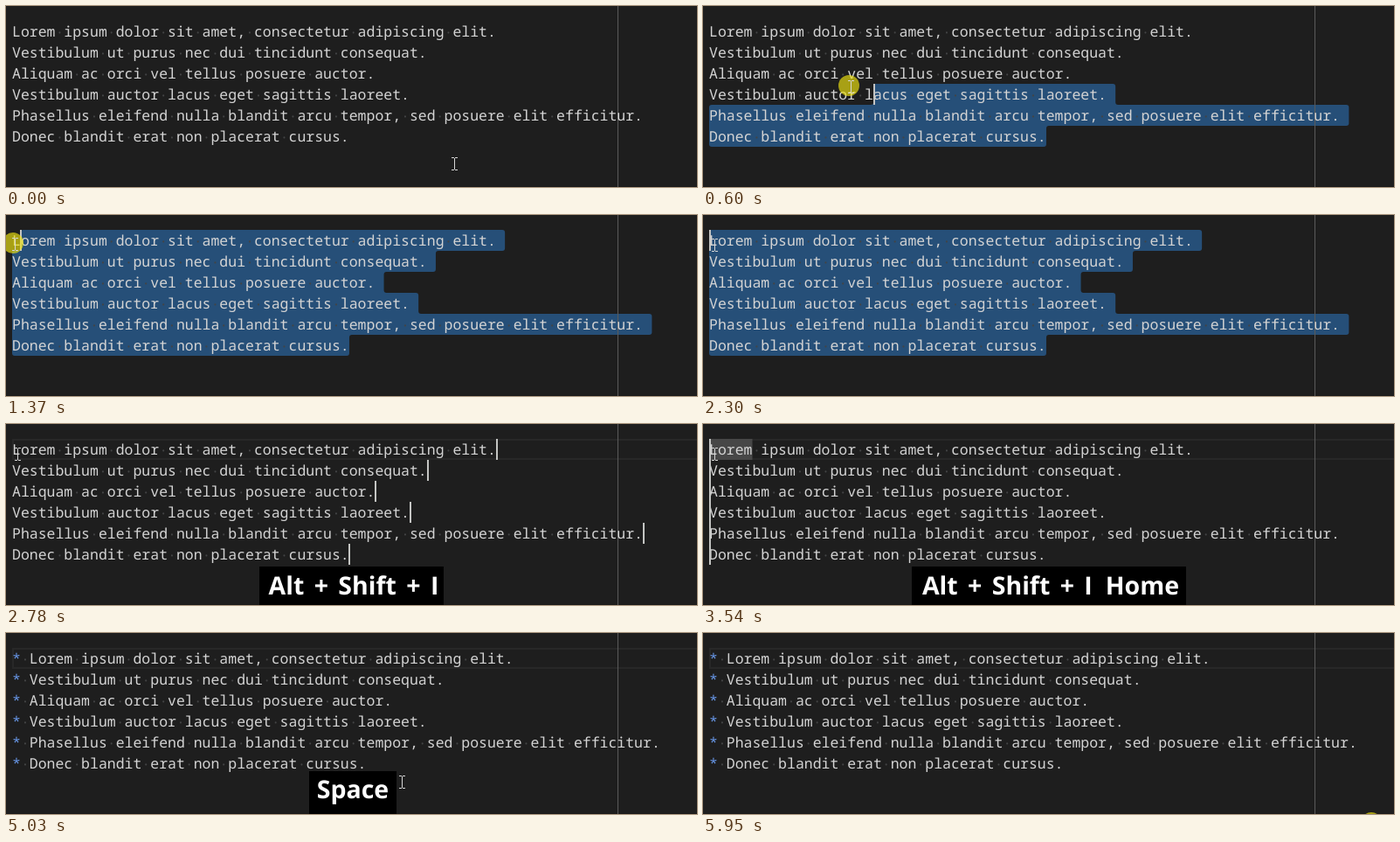
Animation, 791 px wide and 207 px high, one loop 6040 ms. Source, as an HTML page:

```html
<!DOCTYPE html>
<html lang="en">
<head>
<meta charset="utf-8">
<title>Multi-cursor editing</title>
<style>
html, body { margin: 0; width: 100%; height: 100%; overflow: hidden; background: #1e1e1e; }
svg { display: block; width: 791px; height: 207px; }
text { text-rendering: geometricPrecision; white-space: pre; }
.code { font: 16.495px "Noto Sans Mono", monospace; fill: #d4d4d4; }
.dots { fill: #434445; }
.bullet { fill: #6796e6; }
#label { font: bold 28.5px "Open Sans", "Noto Sans", sans-serif; fill: #fff; text-anchor: middle; }
.chord { word-spacing: 4px; }
</style>
</head>
<body>
<svg viewBox="0 0 791 207">
  <rect width="791" height="207" fill="#1e1e1e"/>
  <rect y="206" width="791" height="1" fill="#191919"/>
  <rect id="current" x="8" y="18" width="800" height="22" fill="none" stroke="#282828" stroke-width="2"/>
  <path id="selection" fill="#264f78"/>
  <rect id="word" x="7" y="17" width="49.5" height="24" fill="#474747"/>
  <rect x="700" width="1" height="207" fill="#5a5a5a"/>
  <g id="rows"></g>
  <path id="carets" fill="#c4c5c3"/>
  <rect id="box" fill="#000"/>
  <text id="label"></text>
  <g id="mouse">
    <circle id="press" cx="-2.5" cy="-1.5" r="12" fill="#f0e410" fill-opacity=".66"/>
    <path d="M-3.5-7h3M.5-7h3M0-6.5V6.5M-3.5 7h3M.5 7h3" fill="none" stroke="#d6d6d6"/>
  </g>
</svg>
<script>
const LOOP = 6040, LEFT = 7, TOP = 17, ROW = 24, CHAR = 9.897;
const lines = [
  'Lorem ipsum dolor sit amet, consectetur adipiscing elit.',
  'Vestibulum ut purus nec dui tincidunt consequat.',
  'Aliquam ac orci vel tellus posuere auctor.',
  'Vestibulum auctor lacus eget sagittis laoreet.',
  'Phasellus eleifend nulla blandit arcu tempor, sed posuere elit efficitur.',
  'Donec blandit erat non placerat cursus.'
];

// time, x, y, strength of the pressed-button disc
const pointer = [
  [0, 513.5, 180.5, 0], [70, 496, 173, 0], [140, 458, 161, 0], [210, 434.5, 155.5, 0],
  [360, 392, 152, 1], [440, 270, 122, 1], [520, 197, 100, 1], [600, 169.5, 92.5, 1],
  [680, 140, 82, 1], [760, 110, 70, 1], [830, 85, 60, 1], [910, 62, 49, 1],
  [990, 45, 43, 1], [1070, 34, 39, 1], [1140, 26, 37, 1], [1220, 18, 35, 1],
  [1290, 10.5, 33.5, 1], [1770, 10.5, 33.5, .5], [1840, 13.5, 34.5, 0],
  [4960, 160, 75, 0], [5030, 453.5, 170.5, 0], [5110, 600, 189, 0], [5190, 690, 196, 0],
  [5260, 725, 198, 0], [5340, 740, 200, 0], [5420, 744, 203, 0], [5490, 767, 230, 0],
  [5950, 767.5, 218.5, 1]
];
const caretModes = [
  [0, 'none'], [360, 'select'], [1770, 'none'], [2300, 'select'], [2780, 'end'],
  [3230, 'home'], [3710, 'none'], [4100, 'home'], [4710, 'none'], [5190, 'home'], [5720, 'none']
];
const prefixes = [[0, ''], [4100, '*'], [4180, '* ']];

const chord = 'Alt + Shift + I';
// time, box left, box right, box top, baseline, keys
const labels = [
  [0, 0, 0, 0, 0, []],
  [2780, 290, 501, 163, 195, [chord]],
  [3310, 239, 553, 163, 195, [chord, 'Home']],
  [3780, 345, 449, 165, 195, ['Home']],
  [4100, 331, 463, 165, 195, ['Home', '*']],
  [4180, 283, 511, 158, 190, ['Home', '*', 'Space']],
  [4250, 332, 462, 158, 190, ['*', 'Space']],
  [4960, 347, 447, 158, 189, ['Space']],
  [5190, 0, 0, 0, 0, []]
];

const $ = id => document.getElementById(id);
const indexAt = (table, t) => table.findLastIndex(step => step[0] <= t);
const at = (table, t) => table[indexAt(table, t)];
const colX = col => LEFT + col * CHAR;
const rowY = row => TOP + row * ROW;

function set(node, attrs) {
  for (const key in attrs) node.setAttribute(key, attrs[key]);
  return node;
}
function make(parent, tag, attrs, text = '') {
  const node = document.createElementNS('http://www.w3.org/2000/svg', tag);
  node.textContent = text;
  parent.append(set(node, attrs));
  return node;
}

function drawRows(prefix, blue) {
  $('rows').replaceChildren();
  lines.forEach((line, i) => {
    const full = prefix + line, y = rowY(i) + 18;
    const dots = [...full].map(c => c === ' ' ? '·' : '\u00a0').join('');
    make($('rows'), 'text', { class: 'code dots', x: LEFT, y: y + 1 }, dots);
    const row = make($('rows'), 'text', { class: 'code', x: LEFT, y });
    if (prefix) make(row, 'tspan', blue ? { class: 'bullet' } : {}, prefix);
    make(row, 'tspan', {}, line);
  });
}

function roundedPath(points, radius) {
  const pts = points.filter((p, i) => {
    const q = points[(i + 1) % points.length];
    return Math.hypot(p[0] - q[0], p[1] - q[1]) > .01;
  });
  const toward = (a, b) => {
    const d = Math.hypot(b[0] - a[0], b[1] - a[1]);
    const k = Math.min(radius, d / 2) / d;
    return [a[0] + (b[0] - a[0]) * k, a[1] + (b[1] - a[1]) * k];
  };
  return pts.map((p, i) => {
    const prev = pts[(i + pts.length - 1) % pts.length], next = pts[(i + 1) % pts.length];
    return `${i ? 'L' : 'M'}${toward(p, prev)}Q${p} ${toward(p, next)}`;
  }).join('') + 'Z';
}

// The selection follows the pointer one step late.
function selectionStart(t) {
  const [, x, y] = pointer[Math.max(0, indexAt(pointer, t) - 1)];
  const row = Math.max(0, Math.min(5, Math.floor((y - TOP) / ROW)));
  const col = Math.max(0, Math.min(lines[row].length, Math.round((x - LEFT) / CHAR)));
  return { row, col };
}

function selectionPath({ row, col }) {
  const last = lines.length - 1, start = colX(col);
  if (row === last && col === lines[last].length) return '';
  const points = [[start, rowY(row)]];
  for (let i = row; i <= last; i++) {
    const right = colX(lines[i].length + (i < last ? 1 : 0));
    points.push([right, rowY(i)], [right, rowY(i + 1)]);
  }
  if (row < last) points.push([LEFT, rowY(last + 1)], [LEFT, rowY(row + 1)]);
  points.push([start, rowY(row + 1)]);
  return roundedPath(points, 3);
}

function caretPath(mode, start, prefix) {
  const bar = (row, col) => `M${Math.floor(colX(col))} ${rowY(row)}h2v${ROW}h-2z`;
  if (mode === 'none') return '';
  if (mode === 'select') return bar(start.row, start.col);
  return lines.map((line, i) =>
    bar(i, prefix.length + (mode === 'end' ? line.length : 0))).join('');
}

function drawLabel([, x0, x1, top, base, keys]) {
  set($('box'), { x: x0, y: top, width: x1 - x0, height: keys.length ? 207 - top : 0 });
  set($('label'), { x: keys[0] === chord ? 398 : 397, y: base }).replaceChildren();
  keys.forEach((key, i) => make($('label'), 'tspan',
    { dx: i ? 15 : 0, class: key === chord ? 'chord' : '' }, key));
}

function show(node, visible) {
  node.style.display = visible ? '' : 'none';
}

function draw(t) {
  const [, x, y, press] = at(pointer, t);
  const prefix = at(prefixes, t)[1];
  const start = selectionStart(t);
  drawRows(prefix, t >= 4250);
  set($('selection'), { d: t >= 360 && t < 2780 ? selectionPath(start) : '' });
  set($('carets'), { d: caretPath(at(caretModes, t)[1], start, prefix) });
  show($('current'), t >= 2780);
  show($('word'), t >= 3540 && t < 4100);
  drawLabel(at(labels, t));
  set($('mouse'), { transform: `translate(${x} ${y})` });
  set($('press'), { opacity: press });
}

const changes = [...new Set(
  [pointer, caretModes, prefixes, labels].flat().map(step => step[0]).concat(3540)
)].sort((a, b) => a - b);
const began = performance.now();
let shown = -1;

function tick() {
  const t = (performance.now() - began) % LOOP;
  const now = changes.findLast(time => time <= t);
  if (now !== shown) draw(shown = now);
  requestAnimationFrame(tick);
}
tick();
</script>
</body>
</html>
```
